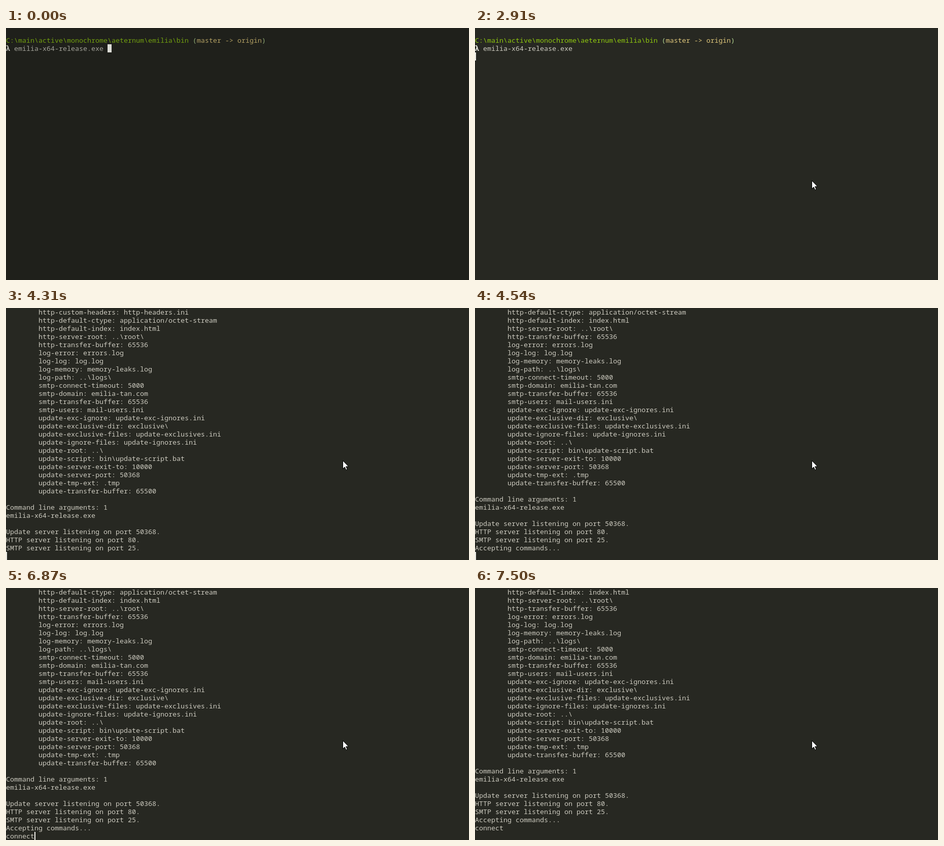
An HTML page that plays this animation: 912x496 px, repeating every 8 s.

```html
<!DOCTYPE html>
<html lang="en">
<head>
<meta charset="utf-8">
<title>Terminal session</title>
<style>
  html, body { margin: 0; width: 100%; height: 100%; overflow: hidden; background: #272822; }
  svg { display: block; width: 912px; height: 496px; }
  text { font: 13.333px "Noto Sans Mono", "DejaVu Sans Mono", monospace; white-space: pre; fill: var(--text); }
  svg { --bg: #272822; --text: #cccabf; --path: #8fc80f; --branch: #e0c87c; --paren: #b4d894; --bright: #f8f8f2; }
  svg.dim { --bg: #1f201b; --text: #a2a198; --path: #729f10; --branch: #b3a063; --paren: #90ad77; --bright: #c6c6c1; }
  #bg { fill: var(--bg); }
  .path { fill: var(--path); }
  .branch { fill: var(--branch); }
  .paren { fill: var(--paren); }
  .lambda { fill: var(--bright); font-weight: 600; }
</style>
</head>
<body>
<svg id="stage" viewBox="0 0 912 496">
  <rect id="bg" width="912" height="496"/>
  <g id="prompt">
    <text x="0" y="29"><tspan class="path">C:\main\active\monochrome\aeternum\emilia\bin</tspan> <tspan class="paren">(</tspan><tspan class="branch">master -&gt; origin</tspan><tspan class="paren">)</tspan></text>
    <text x="0" y="45"><tspan class="lambda">λ</tspan><tspan x="16">emilia-x64-release.exe</tspan></text>
  </g>
  <g id="output"></g>
  <rect id="caret" height="16" fill="#f0f0ea"/>
  <path id="mouse" d="M.5 .5V16.6L4.2 13L6.8 18.7L9.2 17.6L6.7 12H11.7Z" fill="#fff" stroke="#000" stroke-width="1"/>
</svg>
<script>
const LOOP = 8000, ROW = 16, COL = 8, LAST_ROW = 30;
const $ = id => document.getElementById(id);
const stage = $("stage"), prompt_ = $("prompt"), output = $("output"), caret = $("caret"), mouse = $("mouse");

const settings = String.raw`http-custom-headers: http-headers.ini
http-default-ctype: application/octet-stream
http-default-index: index.html
http-server-root: ..\root\
http-transfer-buffer: 65536
log-error: errors.log
log-log: log.log
log-memory: memory-leaks.log
log-path: ..\logs\
smtp-connect-timeout: 5000
smtp-domain: emilia-tan.com
smtp-transfer-buffer: 65536
smtp-users: mail-users.ini
update-exc-ignore: update-exc-ignores.ini
update-exclusive-dir: exclusive\
update-exclusive-files: update-exclusives.ini
update-ignore-files: update-ignores.ini
update-root: ..\
update-script: bin\update-script.bat
update-server-exit-to: 10000
update-server-port: 50368
update-tmp-ext: .tmp
update-transfer-buffer: 65500`.split("\n");

const messages = `
Command line arguments: 1
emilia-x64-release.exe

Update server listening on port 50368.
HTTP server listening on port 80.
SMTP server listening on port 25.
Accepting commands...`.split("\n");

const lines = [
  ...settings.map(text => ({ text, x: 8 * COL })),
  ...messages.map(text => ({ text, x: 0 }))
];

const command = "connect";
const keyTimes = [6110, 6260, 6340, 6490, 6570, 6640, 6870];
const startTime = 3290, readyTime = 4540, enterTime = 6950;
const focusTime = 890, runTime = 1900;

// Times at which the caret is hidden: [from, to)
const hidden = [[1440, 1900], [2450, 2910], [3760, 4310], [4860, 5410], [5940, 6110], [7500, 8000]];

const mouseSteps = [[510, 729, 396], [590, 682, 328], [660, 663, 300]];

const rows = Array.from({ length: LAST_ROW + 1 }, (_, i) => {
  const row = document.createElementNS("http://www.w3.org/2000/svg", "text");
  row.setAttribute("y", i * ROW + 13);
  return output.appendChild(row);
});

function show(el, on) {
  el.style.display = on ? "" : "none";
}

function drawOutput(t, typed) {
  const scroll = (t >= readyTime) + (t >= enterTime);
  const visible = t < readyTime ? lines.slice(0, -1) : lines.slice(scroll);
  const screen = [...visible, { text: typed, x: 0 }];
  rows.forEach((row, i) => {
    const line = screen[i] || { text: "", x: 0 };
    row.setAttribute("x", line.x);
    if (row.textContent !== line.text) row.textContent = line.text;
  });
}

function drawCaret(t, typedCount) {
  let x = 0, y = LAST_ROW * ROW;
  if (t < runTime) { x = 25 * COL; y = 2 * ROW; }
  else if (t < startTime) y = 3 * ROW;
  else if (t < enterTime) x = typedCount * COL;
  caret.setAttribute("x", x);
  caret.setAttribute("y", y);
  caret.setAttribute("width", t < focusTime ? COL : 2);
  caret.setAttribute("fill", t < focusTime ? "#dcdcd6" : "#f0f0ea");
  show(caret, !hidden.some(([from, to]) => t >= from && t < to));
}

function drawMouse(t) {
  const step = mouseSteps.filter(s => t >= s[0]).pop();
  show(mouse, step);
  if (step) mouse.setAttribute("transform", `translate(${step[1]} ${step[2]})`);
}

function draw(t) {
  const count = keyTimes.filter(k => t >= k).length;
  const running = t >= startTime;
  stage.classList.toggle("dim", t < focusTime);
  show(prompt_, !running);
  show(output, running);
  if (running) drawOutput(t, command.slice(0, count));
  drawCaret(t, count);
  drawMouse(t);
}

const began = performance.now();
function tick() {
  draw((performance.now() - began) % LOOP);
  requestAnimationFrame(tick);
}
tick();
</script>
</body>
</html>
```
